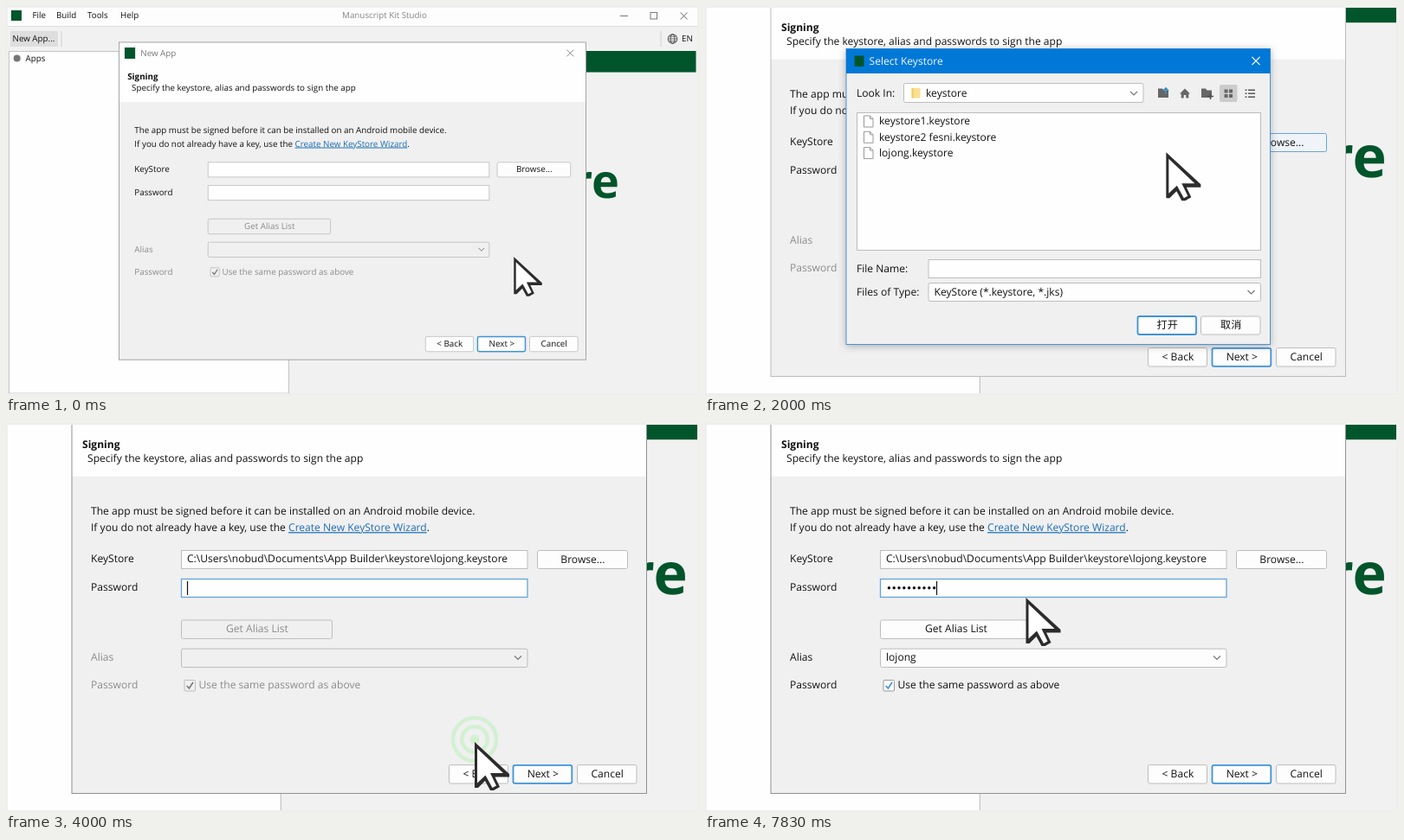
An HTML page that plays this animation: 800 by 450 pixels, repeating every 8000 ms.

```html
<!DOCTYPE html>
<html lang="en">
<head>
<meta charset="utf-8">
<title>Keystore selection</title>
<style>
html, body { margin: 0; width: 100%; height: 100%; overflow: hidden; background: #eeeeee; }
svg { display: block; width: 800px; height: 450px; }
text { font: 12.08px "Open Sans", "Noto Sans", sans-serif; white-space: pre; text-rendering: geometricPrecision; }
.cjk { font-family: "Noto Sans CJK SC", "Noto Sans CJK", sans-serif; }
.small { font-size: 9.8px; }
.bold { font-weight: 700; }
.banner { font-size: 54px; font-weight: 700; }
</style>
</head>
<body>
<svg viewBox="0 0 800 450">
  <defs>
    <clipPath id="stage"><rect x="2" y="2" width="796" height="446"/></clipPath>
    <filter id="shadow" x="-10%" y="-10%" width="120%" height="120%">
      <feDropShadow dx="0" dy="1.5" stdDeviation="4" flood-color="#000" flood-opacity=".28"/>
    </filter>
  </defs>
  <rect width="800" height="450" fill="#eeeeee"/>
  <g clip-path="url(#stage)"><g id="scene"></g></g>
</svg>
<script>
const LOOP = 8000, FPS = 6;
const BLUE = '#3f93dc', FOCUS = '#65a2de', GREY = '#bdbdbd', PALE = '#f0f0f0', GREEN = '#00552b', DIM = '#8b8b8b', INK = '#111';
const scene = document.getElementById('scene');

const ramp = (v, a, b) => Math.min(1, Math.max(0, (v - a) / (b - a)));
const lerp = (a, b, p) => a + (b - a) * p;

// Boxes are given by their left, top, right and bottom edges.
const box = (l, t, r, b, fill, stroke = 'none', width = 1, round = 0) =>
  `<rect x="${l}" y="${t}" width="${r - l}" height="${b - t}" rx="${round}" fill="${fill}" stroke="${stroke}" stroke-width="${width}"/>`;
const text = (x, y, s, fill = INK, cls = '', anchor = 'start') =>
  `<text x="${x}" y="${y}" fill="${fill}" class="${cls}" text-anchor="${anchor}">${s}</text>`;
const line = (d, stroke, width = 1) => `<path d="${d}" fill="none" stroke="${stroke}" stroke-width="${width}"/>`;
const shape = (d, fill) => `<path d="${d}" fill="${fill}"/>`;
const cross = (x, y, r, stroke, width) =>
  line(`M${x - r} ${y - r}l${2 * r} ${2 * r}m0 ${-2 * r}l${-2 * r} ${2 * r}`, stroke, width);
const chevron = (x, y) => line(`M${x - 4} ${y - 2}l4 4l4 -4`, '#777', 1.2);

function button(l, t, r, b, label, { fill = '#fdfdfd', stroke = GREY, width = 1, ink = INK, cls = '' } = {}) {
  return box(l, t, r, b, fill, stroke, width, 2) +
    text((l + r) / 2 + .4, (t + b) / 2 + 3.5, label, ink, cls, 'middle');
}

// Main window, drawn in its unzoomed coordinates.
function appWindow() {
  const label = (x, y, s) => text(x, y, s, INK, 'small');
  return `<g transform="scale(1.2308) translate(-68.7 -61)">` +
    box(0, 0, 800, 450, '#f1f1f1') +
    box(0, 0, 800, 23, '#fdfdfd') + line('M0 23.5H800', '#dedede') +
    box(6, 5, 18, 17, GREEN) +
    label(30.5, 14.5, 'File') + label(58, 14.5, 'Build') + label(94, 14.5, 'Tools') + label(132, 14.5, 'Help') +
    text(437, 14.5, 'Manuscript Kit Studio', '#858585', 'small', 'middle') +
    line('M709 11.5h9', '#777') + box(744, 7.5, 751.5, 15, 'none', '#777') + cross(782.5, 11.5, 4, '#777', 1) +
    box(5, 29, 60, 47, '#dedede') + label(7.5, 41.3, 'New App...') +
    line('M64 29v18M756 29v18', '#cfcfcf') +
    `<g fill="none" stroke="#555"><circle cx="769.5" cy="38" r="5.3"/><ellipse cx="769.5" cy="38" rx="2.4" ry="5.3"/></g>` +
    line('M764 38h11M765 35.2h9M765 40.8h9', '#555', .8) + label(780, 41.5, 'EN') +
    box(3.5, 52.5, 326.5, 448, '#fefefe', '#c4c4c4') +
    `<circle cx="12.7" cy="60.5" r="4" fill="#777"/>` + label(22.5, 64.3, 'Apps') +
    box(330, 52, 796.5, 76.6, GREEN) +
    text(708, 222, 're', GREEN, 'banner', 'end') +
    '</g>';
}

function wizard(k) {
  const chooser = k >= 10 && k < 23, picked = k >= 23, ready = k >= 42;
  const pressed = k >= 7 && k < 10;
  const ink = ready ? INK : DIM, fill = ready ? '#fdfdfd' : PALE;
  const browse = pressed ? { fill: '#e5e5e5', stroke: '#69a3dc', width: 2 }
    : chooser ? { fill: '#f0f4f8', stroke: '#69a3dc' } : {};
  const edge = chooser ? '#bcbcbc' : '#929292';
  let s = box(76, -23.4, 739.5, 428.5, PALE) + box(76, -23.4, 739.5, 61.7, '#fefefe') +
    box(76, -23.4, 739.5, 428.5, 'none', edge) +
    box(84, -16, 99, 0, GREEN) +
    text(106.5, -4, 'New App', '#777') + cross(717, -8, 4.8, '#777', 1.1) +
    text(88, 29, 'Signing', INK, 'bold') +
    text(94, 45.3, 'Specify the keystore, alias and passwords to sign the app') +
    text(98, 106, 'The app must be signed before it can be installed on an Android mobile device.') +
    text(98, 125.2, 'If you do not already have a key, use the <tspan fill="#1b6cb5" text-decoration="underline">Create New KeyStore Wizard</tspan>.') +
    text(98, 161.3, 'KeyStore') + box(202.5, 147.5, 602, 168.5, '#fefefe', GREY) +
    button(613.5, 147.5, 717.5, 168.5, 'Browse...', browse) +
    text(98, 194.4, 'Password') + box(202.5, 180.5, 602, 201.5, '#fefefe', picked ? FOCUS : GREY, picked ? 1.3 : 1) +
    button(202.5, 228, 376.5, 249.5, 'Get Alias List', { fill, ink }) +
    text(98, 275.2, 'Alias', ink) + box(202.5, 261.2, 602, 282.5, fill, GREY, 1, 2) + chevron(591, 271.5) +
    text(98, 307.4, 'Password', ink) + box(206, 297.5, 218.5, 310, fill, ready ? '#999' : GREY, 1, 1) +
    line('M208.7 304l2.7 3l4.6 -7', ready ? '#3c8fd8' : '#777', 1.6) +
    text(222.5, 307.4, 'Use the same password as above', ink) +
    button(511.5, 395.5, 579.5, 417, '&lt; Back') +
    button(585.5, 395.8, 653.3, 416.8, 'Next &gt;', pressed ? {} : { stroke: BLUE, width: 1.8 }) +
    button(659.5, 395.5, 728, 417, 'Cancel');
  if (picked) s += text(209, 161.3, 'C:\\Users\\nobud\\Documents\\App Builder\\keystore\\lojong.keystore');
  if (ready) s += text(209, 275.2, 'lojong');
  return s + password(k);
}

function password(k) {
  const count = k < 40 ? Math.min(5, Math.max(0, k - 33)) : Math.min(10, 7 + (k - 40) * 2);
  const start = 209.5, pitch = 5.8;
  let s = '';
  for (let i = 0; i < count; i++) s += `<circle cx="${start + pitch * (i + .5)}" cy="190.7" r="1.7" fill="${INK}"/>`;
  const caret = (k >= 23 && k < 25) || (k >= 27 && k < 30) || (k >= 33 && k < 44) || k >= 47;
  return s + (caret ? line(`M${start + pitch * count} 183v16`, INK, 1.2) : '');
}

function fileChooser(k) {
  const selected = k >= 17;
  const folder = (x, y, fill) => shape(`M${x} ${y}h5l1.5 2h5.5v8.5h-12z`, fill);
  const names = ['keystore1.keystore', 'keystore2 fesni.keystore', 'lojong.keystore'];
  const files = names.map((name, i) => {
    const y = 127 + i * 18.3, active = selected && i === 2;
    return (active ? box(176, y - 3.4, 298, y + 15.6, '#007a3d') : '') +
      `<path d="M183.5 ${y}h7l3.5 3.5v9.5h-10.5zM190.5 ${y}v3.5h3.5" fill="#fff" stroke="#999"/>` +
      text(201, y + 10.3, name, active ? '#fff' : INK);
  }).join('');
  const dots = [0, 1, 2, 3].map(i => {
    const x = 599.5 + (i % 2) * 5.5, y = 96.5 + (i >> 1) * 5.5;
    return box(x, y, x + 4, y + 4, '#666');
  }).join('');
  return `<g filter="url(#shadow)">${box(163, 49.5, 652.5, 391.5, PALE, '#4a94d4')}</g>` +
    box(163, 49.5, 652.5, 78, '#0078d7') +
    box(172.5, 57.5, 183.5, 70, GREEN) + text(189.5, 68.3, 'Select Keystore', '#f2f8ff') + cross(636, 63.5, 4.6, '#fff', 1.2) +
    text(175, 105, 'Look In:') + box(229.5, 89.5, 506, 111.5, '#fefefe', GREY, 1, 2) +
    box(238.5, 95, 248.5, 106.5, '#fbe08f') + box(238.5, 95, 241, 106.5, '#f3cf6d') +
    text(255, 105, 'keystore') + chevron(495, 101) +
    folder(523, 95.5, '#666') + line('M532 102v-7m-3 3l3 -3l3 3', '#3b8fc4', 1.6) +
    shape('M548 101.5l6 -6l6 6h-1.7v5h-3v-3.5h-2.6v3.5h-3v-5z', '#666') +
    folder(573, 95.5, '#666') + line('M583.5 101v7m-3.5 -3.5h7', '#555', 1.6) +
    box(594, 91, 614.5, 111, '#cccccc', 'none', 1, 2) + dots +
    line('M623.5 97.2h2m1.5 0h8M623.5 101.2h2m1.5 0h8M623.5 105.2h2m1.5 0h8', '#555', 1.5) +
    box(175.5, 123.5, 641.5, 282.5, '#fefefe', selected ? '#7ba7cf' : GREY) + files +
    text(175, 308, 'File Name:') + box(258, 293.5, 641.5, 314.5, '#fefefe', GREY) +
    (k >= 18 ? text(264.5, 308, names[2]) : '') +
    text(175, 335, 'Files of Type:') + box(258, 320.5, 641.5, 341.5, '#fefefe', GREY, 1, 2) +
    text(264.5, 335, 'KeyStore (*.keystore, *.jks)') + chevron(630.5, 331) +
    button(499.5, 359, 567, 380, '打开', { stroke: BLUE, width: 1.8, cls: 'cjk' }) +
    button(572.5, 359, 641, 380, '取消', { cls: 'cjk' });
}

const SPOTS = { rest: [637, 279], browse: [669.5, 164], file: [258, 171], open: [541, 366], field: [370.5, 199] };
const MOVES = [
  [1.8, 5.35, 'rest', 'browse'],
  [10.5, 15, 'browse', 'file'],
  [18, 21, 'file', 'open'],
  [24, 29, 'open', 'field']
];
// Each click ring: place, fade-in start and end, fade-out start and end.
const RINGS = [
  ['browse', 3, 4.5, 6, 8],
  ['file', 15, 16.5, 18, 20],
  ['open', 16.5, 19.5, 22.2, 24.25]
];

function clickRings(k) {
  return RINGS.map(([spot, a, b, c, d]) => {
    const opacity = ramp(k, a, b) - ramp(k, c, d);
    if (opacity <= 0) return '';
    const [x, y] = SPOTS[spot];
    return `<g transform="translate(${x} ${y})" opacity="${opacity}" fill="none" stroke="#0cf50c" stroke-width="4.6">` +
      `<circle r="25"/><circle r="14.8"/><circle r="5.5" fill="#0cf50c" stroke="none"/></g>`;
  }).join('');
}

function pointer(k) {
  const [a, b, from, to] = MOVES.filter(m => k >= m[0]).pop() || MOVES[0];
  const p = ramp(k, a, b);
  const [x, y] = [0, 1].map(i => lerp(SPOTS[from][i], SPOTS[to][i], p));
  const overField = k > 24 && k < 47 && y < 201.5;
  const art = overField
    ? box(-16.5, -28, 17.5, -20, '#333') + box(-16.5, 20, 17.5, 28, '#333') +
      box(-15, -26, 16, -23.5, '#666') + box(-15, 22.5, 16, 25, '#666') +
      box(-5.5, -24, 6.5, 24, '#4c4c4c', '#1c1c1c', 2)
    : `<g transform="translate(1 4)">` +
      shape('M-1 -1V52H3L11 44L17 55H21L28 51L22.5 39.5H39V36z', '#2c2c2c') +
      shape('M2 6.5V46.5L11.5 37.5L19.5 52L24 49.5L17 35H32z', '#fff') + '</g>';
  return `<g transform="translate(${x} ${y})">${art}</g>`;
}

function draw(k) {
  const zoom = ramp(k, 1.92, 7.92);
  scene.setAttribute('transform',
    `translate(${lerp(68.7, 0, zoom)} ${lerp(61, 0, zoom)}) scale(${lerp(.8125, 1, zoom)})`);
  scene.innerHTML = appWindow() + wizard(k) + (k >= 10 && k < 23 ? fileChooser(k) : '') + clickRings(k) + pointer(k);
}

let shown = -1;
function tick() {
  const k = Math.floor((performance.now() % LOOP + 7) * FPS / 1000) % (LOOP * FPS / 1000);
  if (k !== shown) draw(shown = k);
  requestAnimationFrame(tick);
}
tick();
</script>
</body>
</html>
```
